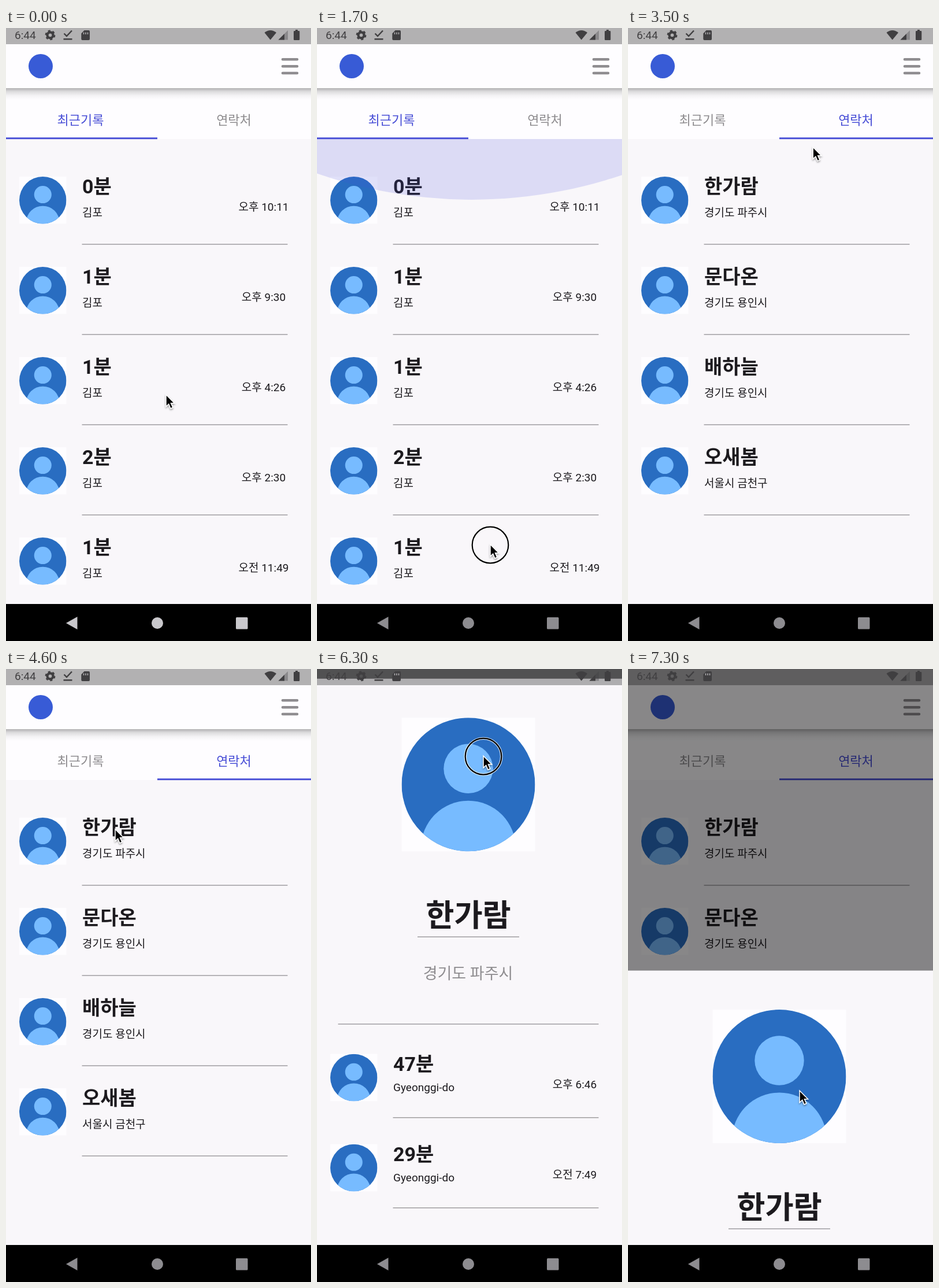
Write an HTML page that moves like this. It is 528 px wide and 1060 px high and loops after 7.4 s.

```html
<!DOCTYPE html>
<html lang="ko">
<head>
<meta charset="utf-8">
<title>Call log</title>
<style>
  html, body { margin: 0; width: 100%; height: 100%; overflow: hidden; background: #f9f7fa; }
  svg { display: block; width: 100%; height: 100%; }
  text { font-family: Roboto, "Noto Sans CJK KR", "Noto Sans CJK", sans-serif; fill: #1c1a1e; }
  .title { font-size: 34px; font-weight: 700; }
  .sub { font-size: 19px; }
  .tab { font-size: 22px; }
  .mid { text-anchor: middle; }
  .rule { stroke: #9f9da0; stroke-width: 1.6; }
</style>
</head>
<body>
<svg id="stage" viewBox="0 0 528 1060" xmlns="http://www.w3.org/2000/svg"></svg>
<script>
const LOOP = 7400, STEP = 100;
const PAGE = 532, ROW = 156, MAX_SCROLL = 103, SHEET = 1064;
const INK = '#403f41', BLUE = '#474dd6', GREY = '#8d8b8e';

// ---------- drawing helpers ----------
const text = (x, y, cls, s, extra = '') => `<text x="${x}" y="${y}" class="${cls}" ${extra}>${s}</text>`;
const rule = (x1, x2, y) => `<path class="rule" d="M${x1} ${y}H${x2}"/>`;
const rect = (x, y, w, h, fill, extra = '') => `<rect x="${x}" y="${y}" width="${w}" height="${h}" fill="${fill}" ${extra}/>`;
const avatar = (x, y, size) => `<use href="#avatar" transform="translate(${x} ${y}) scale(${size / 231})"/>`;

function row(y, title, sub, time, compact) {
  return avatar(23, y, 81.5) +
    text(132, y + 29, 'title', title) +
    text(132, y + (compact ? 64.5 : 68.5), 'sub', sub) +
    (time ? text(446, y + 59, 'sub mid', time) : '') +
    rule(131.5, 487.5, y + (compact ? 110 : 117));
}

const calls = [
  ['0분', '오후 10:11'], ['1분', '오후 9:30'], ['1분', '오후 4:26'],
  ['2분', '오후 2:30'], ['1분', '오전 11:49'], ['0분', '오전 9:03']
];
const people = [
  ['한가람', '경기도 파주시'], ['문다온', '경기도 용인시'],
  ['배하늘', '경기도 용인시'], ['오새봄', '서울시 금천구']
];

const defs = `<defs>
  <clipPath id="disc"><circle cx="115.5" cy="115.5" r="115.5"/></clipPath>
  <clipPath id="list"><rect y="192" width="528" height="804"/></clipPath>
  <clipPath id="rightTab"><rect x="262" y="104" width="266" height="88"/></clipPath>
  <linearGradient id="shade" x2="0" y2="1">
    <stop offset="0" stop-opacity=".3"/><stop offset=".3" stop-opacity=".13"/>
    <stop offset=".65" stop-opacity=".04"/><stop offset="1" stop-opacity="0"/>
  </linearGradient>
  <filter id="soft" x="-50%" y="-50%" width="200%" height="200%">
    <feDropShadow dx="0" dy="2" stdDeviation="1.5" flood-opacity=".4"/>
  </filter>
  <g id="avatar">
    ${rect(0, 0, 231, 231, '#fefdff')}
    <g clip-path="url(#disc)">
      ${rect(0, 0, 231, 231, '#296dc1')}
      <circle cx="115.5" cy="88" r="42.7" fill="#77bbff"/>
      <circle cx="115.5" cy="225.5" r="82" fill="#77bbff"/>
    </g>
  </g>
</defs>`;

const lists = `<g clip-path="url(#list)">
  <g id="recent">${calls.map(([d, t], i) => row(257 + i * ROW, d, '김포', t)).join('')}</g>
  <g id="contacts">${people.map(([n, p], i) => row(257 + i * ROW, n, p)).join('')}</g>
  <ellipse id="glow" cx="268" rx="798" fill="${BLUE}"/>
</g>`;

const tabs = rect(0, 104, 528, 88, '#fefdff') +
  `<g clip-path="url(#rightTab)">
    ${rect(262, 104, 266, 88, '#000', 'id="hover"')}
    <circle id="ripple" cx="413" cy="156"/>
  </g>` +
  text(129, 166.5, 'tab mid', '최근기록', 'id="tabA"') +
  text(394.5, 166.5, 'tab mid', '연락처', 'id="tabB"') +
  rect(0, 189.3, 266, 2.9, BLUE, 'id="bar"');

const header = rect(0, 104, 528, 20, 'url(#shade)') +
  rect(0, 0, 528, 104, '#fefdff') +
  `<circle cx="60" cy="66" r="21" fill="#385bd6"/>
  <path d="M479 54.3H504M479 66.3H504M479 78H504" stroke="#8f8d90" stroke-width="4.6" stroke-linecap="round"/>`;

const sheet = `<g id="sheet">
  ${rect(0, -4, 528, 1100, '#f9f7fa')}
  ${avatar(146.5, 63.5, 231)}
  ${text(262, 424, 'mid', people[0][0], 'font-size="53.5" font-weight="700"')}
  ${rule(174, 350, 442.5)}
  ${text(261.5, 515, 'mid', people[0][1], 'font-size="27" style="fill:#8f8d90"')}
  ${rule(36.5, 487.5, 593.2)}
  ${row(645, '47분', 'Gyeonggi-do', '오후 6:46', true)}
  ${row(645 + ROW, '29분', 'Gyeonggi-do', '오전 7:49', true)}
</g>`;

const status = rect(0, 0, 528, 28, '#000', 'opacity=".3"') +
  text(15, 19, '', '6:44', `font-size="19" style="fill:${INK}"`) +
  `<g fill="none" stroke="${INK}">
    <circle cx="76.5" cy="12.3" r="5" stroke-width="4.2"/>
    <circle cx="76.5" cy="12.3" r="7.6" stroke-width="2.6" stroke-dasharray="4 3.96"/>
    <path d="M100.5 9.5L105 14L114 4.5M99.5 19.3H114.5" stroke-width="2.4"/>
  </g>
  <g fill="${INK}">
    <path d="M135.5 4H143Q145 4 145 6V19Q145 21 143 21H132.300Q130.300 21 130.300 19V9.500Z"/>
    <path d="M447.500 8Q457.700 0 468 8L457.700 20.500Z"/>
    <path d="M488 4V20.500H471.500Z" opacity=".35"/>
    <path d="M482 10V20.500H471.500Z"/>
    <path d="M501 3H505V5H507Q508.300 5 508.300 6.300V19.700Q508.300 21 507 21H499.300Q498 21 498 19.700V6.300Q498 5 499.300 5H501Z"/>
  </g>
  <path d="M134.500 7.500V11M138 7.500V11M141.500 7.500V11" stroke="#b1b0b2" stroke-width="1.5"/>`;

const nav = rect(0, 996, 528, 64, '#000') +
  `<g id="keys">
    <path d="M104 1029L123.500 1018V1040Z"/>
    <circle cx="262" cy="1029" r="10"/>
    <rect x="398" y="1019" width="20.500" height="20.500" rx="1.500"/>
  </g>`;

const pointer = `<g id="pointer">
  <g id="press" fill="none">
    <circle cy="1" r="31.300" stroke="#fff" stroke-width="4.500" opacity=".75"/>
    <circle cy="1" r="31.300" stroke="#000" stroke-width="2.200"/>
  </g>
  <path d="M0 0V20.500L4.700 16.300L7.900 24L11.800 22.300L8.500 14.800H14.600Z"
    stroke="#fff" stroke-width="1.500" filter="url(#soft)"/>
</g>`;

const stage = document.getElementById('stage');
stage.innerHTML = defs + rect(0, 0, 528, 1060, '#f9f7fa') + lists + tabs + header +
  rect(0, 0, 528, 996, '#000', 'id="scrim"') + sheet + status + nav + pointer;

// ---------- motion ----------
const $ = id => document.getElementById(id);
const set = (id, attrs) => { for (const k in attrs) $(id).setAttribute(k, attrs[k]); };
const move = (id, x, y) => set(id, { transform: `translate(${x} ${y})` });
const clamp = (v, a = 0, b = 1) => Math.min(b, Math.max(a, v));
const span = (t, a, b) => clamp((t - a) / (b - a));
const smooth = u => { u = clamp(u); return u * u * (3 - 2 * u); };

// time, x, y, and whether the way to this point is eased
const path = [
  [0, 277, 634], [300, 277, 634], [1000, 279, 403, 1], [1100, 279, 403],
  [1700, 300, 893, 1], [1800, 300, 893], [2400, 412, 196, 1], [2500, 414, 155],
  [3100, 414, 155], [4000, 189, 277, 1], [5300, 189, 277], [6000, 288, 129.5, 1],
  [6200, 288, 129.5], [6400, 288, 171], [6800, 288, 309], [7200, 292, 600],
  [7300, 297, 729]
];

function cursorAt(t) {
  const i = path.findIndex(p => p[0] > t);
  if (i < 0) return path[path.length - 1].slice(1, 3);
  const a = path[i - 1], b = path[i];
  let u = span(t, a[0], b[0]);
  if (b[3]) u = smooth(u);
  return [a[1] + (b[1] - a[1]) * u, a[2] + (b[2] - a[2]) * u];
}

function sheetShift(t, y) {
  if (t < 6200) return SHEET * (1 - span(t, 4610, 4926)) ** 3;
  return t < 7300 ? Math.max(0, y - 129.5) : 525.5;
}

function drawList(t, y) {
  const up = t < 1100 || (t === 1100);
  const pull = up ? 616 - y : MAX_SCROLL + 421 - y;
  const scroll = t < 1800 ? clamp(pull, 0, MAX_SCROLL) : 0;
  const over = t < 2300 ? Math.max(0, up ? pull - MAX_SCROLL : t < 1800 ? -pull : 369) : 0;
  const fade = 1 - span(t, 1700, 2200);
  const s = (1 - Math.exp(-over / 94)) * (.4 + .6 * fade);
  const lift = (798 - 107) * s;
  set('glow', {
    ry: 798 * s,
    cy: up ? 996 + lift : 192 - lift,
    opacity: .16 * Math.min(1, over / 60) * fade
  });

  const u = (t - 2700) / 435;
  const x = -PAGE * smooth(u);
  move('recent', x, -scroll);
  move('contacts', x + PAGE, 0);
  set('bar', { x: -4 + 266 * (u > 0 ? smooth(u + .028) : 0) });
  const second = t >= 2700;
  $('tabA').style.fill = second ? GREY : BLUE;
  $('tabB').style.fill = second ? BLUE : GREY;
}

function draw(t) {
  const [x, y] = cursorAt(t);
  drawList(t, y);

  const out = 1 - span(t, 2900, 3200);
  set('hover', { opacity: t >= 2600 ? .025 * out : 0 });
  set('ripple', { r: 59 * span(t, 2550, 2800) + 60 * span(t, 2800, 3100), opacity: .075 * out });

  move('sheet', 0, sheetShift(t, y));
  set('scrim', { opacity: .54 * span(t, 4600, 4900) - .075 * span(t, 7200, 7300) });

  const g = Math.round(201 - 60 * span(t, 200, 500));
  set('keys', { fill: `rgb(${g},${g - 1},${g + 3})` });

  move('pointer', x, y);
  const held = (t >= 300 && t < 1800) || t === 2600 || (t >= 6200 && t < 7300);
  set('press', { opacity: held ? 1 : 0 });
}

let start;
function tick(now) {
  start ??= now;
  const t = (now - start) % LOOP;
  draw(Math.floor(t / STEP) * STEP);
  requestAnimationFrame(tick);
}
draw(0);
requestAnimationFrame(tick);
</script>
</body>
</html>
```
